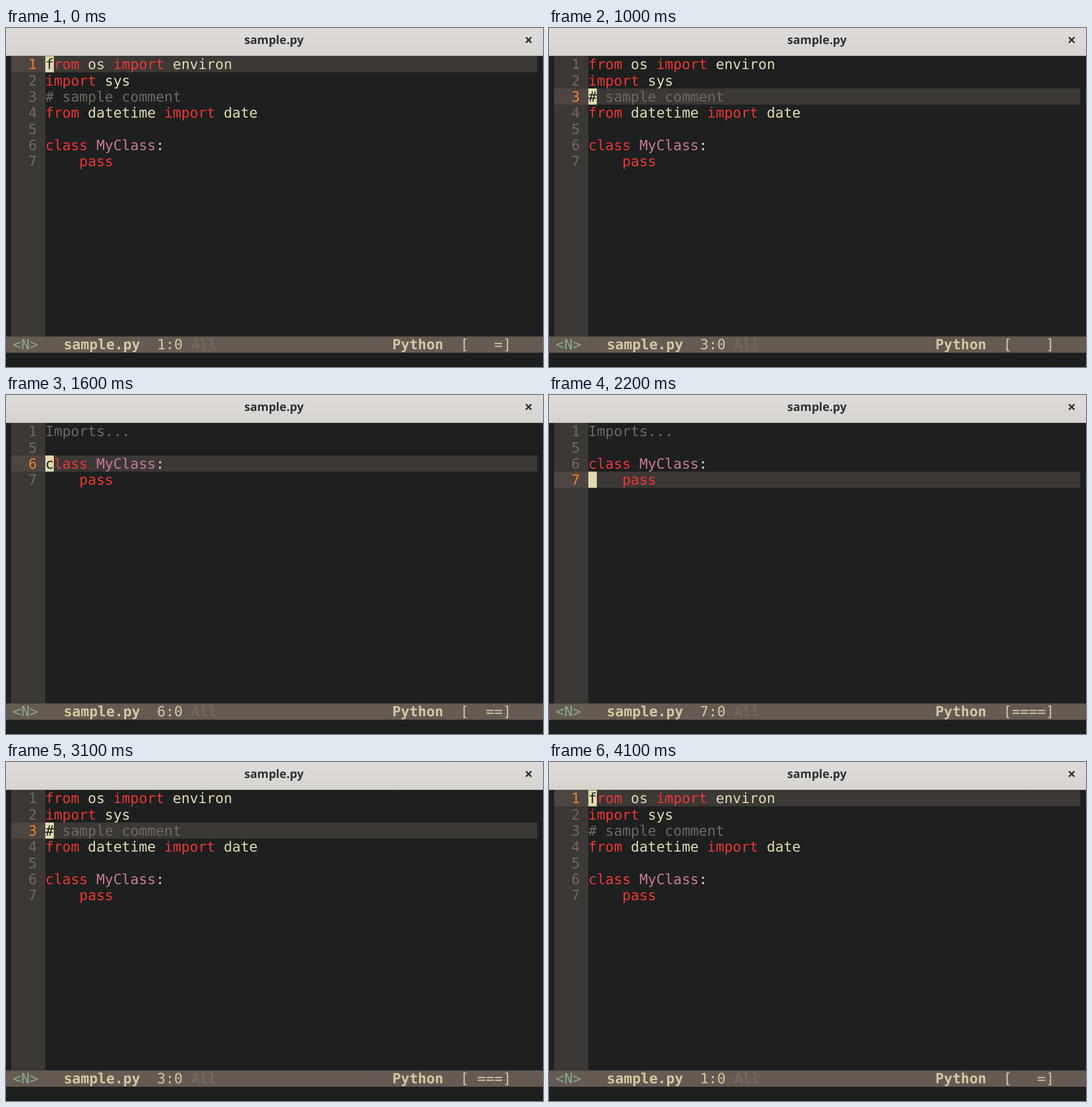
An HTML page for the animation above (4200 ms loop, 942 by 594 pixels).

```html
<!DOCTYPE html>
<html lang="en">
<head>
<meta charset="utf-8">
<title>sample.py</title>
<style>
  html, body { margin: 0; width: 100%; height: 100%; overflow: hidden; background: #1d201f; }
  svg { display: block; width: 942px; height: 594px; }
  text {
    font: 24.75px "DejaVu Sans Mono", monospace;
    white-space: pre;
    text-rendering: geometricPrecision;
  }
  .title { font: bold 20.5px "Noto Sans", sans-serif; fill: #2e3234; text-anchor: middle; }
  .bold { font-weight: bold; }
  .kw { fill: #ee3537; }
  .fg { fill: #e5dab1; }
  .type { fill: #c8789b; }
  .dim { fill: #716860; }
  .now { fill: #f28024; }
  .bar { fill: #d5c7a0; }
  .mode { fill: #86a992; }
  .faint { fill: #766c62; }
  .ink { fill: #1d201f; }
</style>
</head>
<body>
<svg viewBox="0 0 942 594">
  <defs>
    <linearGradient id="head" x1="0" y1="0" x2="0" y2="1">
      <stop offset="0" stop-color="#dfdbd9"/>
      <stop offset="1" stop-color="#d7d3cf"/>
    </linearGradient>
  </defs>
  <rect width="942" height="594" fill="#1d201f"/>
  <rect width="942" height="48" fill="url(#head)"/>
  <rect y="48" width="942" height="1" fill="#b9b4af"/>
  <text class="title" x="470" y="28">sample.py</text>
  <path d="M912 16.2l9.6 9.6m0-9.6l-9.6 9.6" stroke="#2e3234" stroke-width="2.7"/>
  <rect x="9" y="49.3" width="60" height="491.2" fill="#3b3835"/>
  <g id="buffer"></g>
  <rect y="540.5" width="942" height="28.5" fill="#655b53"/>
  <g id="status"></g>
</svg>
<script>
const CELL = 14.9, ROW = 28.33, TOP = 49.3, ASCENT = 23;
const LEFT = 69, BAR_LEFT = 11.8, BAR_BASE = 563.4;

// Each line is a list of [column, class, text]
const lines = [
  [[0, 'kw', 'from'], [5, 'fg', 'os'], [8, 'kw', 'import'], [15, 'fg', 'environ']],
  [[0, 'kw', 'import'], [7, 'fg', 'sys']],
  [[0, 'dim', '# sample comment']],
  [[0, 'kw', 'from'], [5, 'fg', 'datetime'], [14, 'kw', 'import'], [21, 'fg', 'date']],
  [],
  [[0, 'kw', 'class'], [6, 'type', 'MyClass'], [13, 'fg', ':']],
  [[4, 'kw', 'pass']]
];
const folded = [[0, 'dim', 'Imports...']];
const spinner = ['    ', '=   ', '==  ', '=== ', '====', ' ===', '  ==', '   ='];

// [start in ms, cursor line]
const moves = [
  [0, 1], [800, 2], [1000, 3], [1200, 4], [1400, 5], [1600, 6], [1800, 7],
  [2400, 6], [2600, 5], [2800, 4], [3000, 3], [3200, 2], [3400, 1]
];

const buffer = document.getElementById('buffer');
const status = document.getElementById('status');
const text = (x, y, cls, s) => `<text x="${x}" y="${y}" class="${cls}">${s}</text>`;
const rect = (x, y, w, h, fill) =>
  `<rect x="${x}" y="${y}" width="${w}" height="${h}" fill="${fill}"/>`;

function drawBuffer(cursor) {
  const fold = cursor > 4;
  const shown = fold ? [1, 5, 6, 7] : [1, 2, 3, 4, 5, 6, 7];
  let out = '';
  shown.forEach((n, i) => {
    const y = TOP + i * ROW, base = y + ASCENT;
    const tokens = fold && n === 1 ? folded : lines[n - 1];
    const here = n === cursor;
    if (here) {
      out += rect(9, y, 60, ROW, '#4d4541');
      out += rect(LEFT, y, 863, ROW, '#3b3835');
      out += rect(LEFT, y, CELL, ROW, '#e2d8ae');
    }
    out += text(LEFT - 2 * CELL, base, here ? 'now' : 'dim', n);
    for (let [col, cls, s] of tokens) {
      if (here && col === 0) {
        out += text(LEFT, base, 'ink', s[0]);
        s = s.slice(1);
        col = 1;
      }
      out += text(LEFT + col * CELL, base, cls, s);
    }
  });
  buffer.innerHTML = out;
}

function drawStatus(cursor, phase) {
  const put = (col, cls, s) => text(BAR_LEFT + col * CELL, BAR_BASE, cls, s);
  status.innerHTML =
    put(0, 'mode', '&lt;N&gt;') +
    put(6, 'bar bold', 'sample.py') +
    put(17, 'bar', cursor + ':0') +
    put(21, 'faint', 'All') +
    put(44.7, 'bar bold', 'Python') +
    put(52.7, 'bar', `[${spinner[phase]}]`);
}

let last = -1, lastLine = 0;
function tick() {
  const step = Math.floor(performance.now() % 4200 / 100);
  if (step !== last) {
    last = step;
    const cursor = moves.filter(m => m[0] <= step * 100).pop()[1];
    // The spinner pauses for one step early in the loop
    const phase = (step + (step < 4 ? 7 : 6)) % 8;
    if (cursor !== lastLine) drawBuffer(lastLine = cursor);
    drawStatus(cursor, phase);
  }
  requestAnimationFrame(tick);
}
tick();
</script>
</body>
</html>
```
